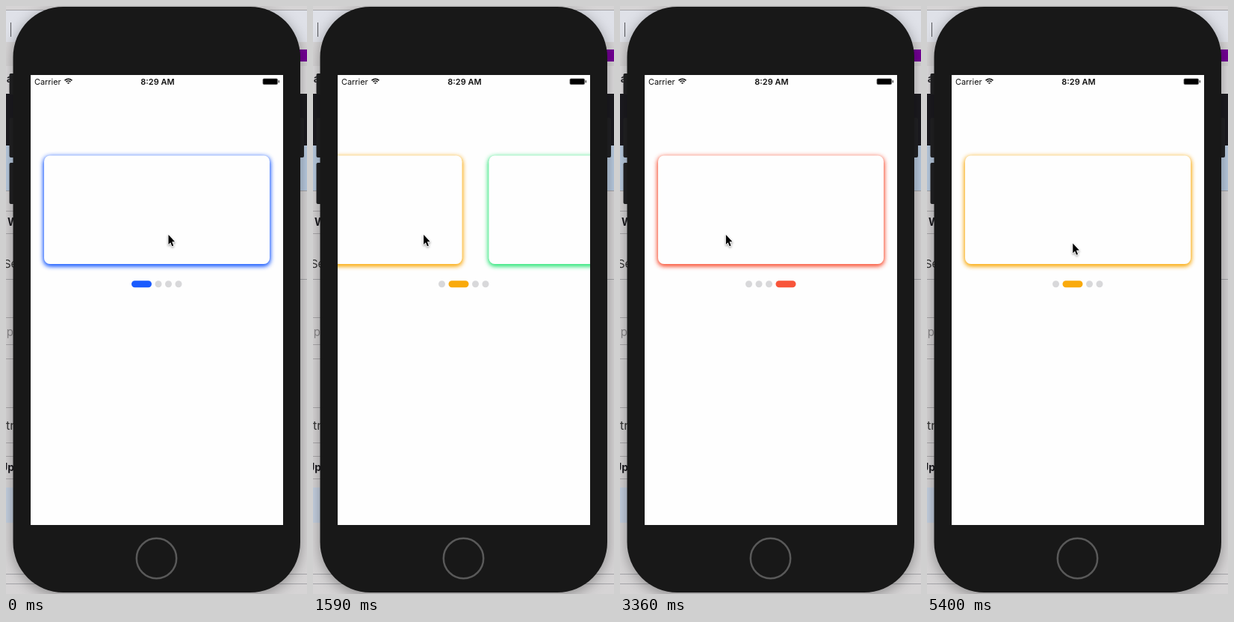
Animation, 403 px wide and 784 px high, one loop 5430 ms. Source, as an HTML page with a canvas:

```html
<!DOCTYPE html>
<html lang="en">
<head>
<meta charset="utf-8">
<title>Card carousel</title>
<style>
  html, body { margin: 0; width: 100%; height: 100%; overflow: hidden; background: #d6d4d5; }
  canvas { display: block; width: 403px; height: 784px; }
</style>
</head>
<body>
<canvas id="stage" width="403" height="784"></canvas>
<script>
const W = 403, H = 784, LOOP = 5430, TICK = 30;
const SCREEN = { x: 33, y: 92, w: 338, h: 600 };
const CARD = { x: 51, y: 199.5, w: 302, h: 144.5, r: 8 };
const SANS = 'Inter, "Helvetica Neue", sans-serif';
const INK = '#1c1b20';
const GREY = [216, 216, 218];
const COLORS = [[26, 91, 254], [249, 170, 12], [46, 230, 122], [248, 85, 58]];

// A swipe drags the pointer from grab to drop, then the page coasts to rest.
const DRAG_MS = 160, SWIPE_MS = 460, DOT_MS = 350;
const SWIPES = [
  { from: 0, to: 1, at: 645, grab: 255, drop: 158 },
  { from: 1, to: 2, at: 1431, grab: 256, drop: 147 },
  { from: 2, to: 3, at: 2770, grab: 180, drop: 136 },
  { from: 3, to: 2, at: 3520, grab: 155, drop: 265 },
  { from: 2, to: 1, at: 4101, grab: 165, drop: 284 }
];
const FIRST_X = 217, LAST_X = 185;

const ctx = document.getElementById('stage').getContext('2d');
const clamp = v => Math.max(0, Math.min(1, v));
const lerp = (a, b, k) => a + (b - a) * k;
const smooth = k => k * k * (3 - 2 * k);

function rect(c, x, y, w, h, color) {
  c.fillStyle = color;
  c.fillRect(x, y, w, h);
}

function pill(c, x, y, w, h, r, color) {
  c.fillStyle = color;
  c.beginPath();
  c.roundRect(x, y, w, h, r);
  c.fill();
}

function label(c, text, x, y, font, color, align = 'left') {
  c.font = font + ' ' + SANS;
  c.fillStyle = color;
  c.textAlign = align;
  c.fillText(text, x, y);
}

// The blurred window behind the phone, seen only along its edges
function drawDesk(c) {
  rect(c, 0, 0, W, H, '#d6d4d5');
  rect(c, 0, 6, W, 42, '#dfe1e8');
  rect(c, 0, 80, W, 37, '#dedcde');
  rect(c, 0, 117, W, 69, INK);
  rect(c, 0, 186, W, 60, '#b8cadf');
  rect(c, 0, 642, 33, 47, '#c5d0e0');
  for (const y of [5, 246, 364, 757, 770]) rect(c, 0, y, W, 1, '#a4a4a8');
  for (const y of [273, 303, 415, 451, 470, 535, 582, 600, 630]) rect(c, 0, y, 33, 1, '#aaa8aa');
  rect(c, 6, 22, 1, 19, '#55565a');
  rect(c, 385, 58, 18, 16, '#740096');
  label(c, 'la', -3, 102, '600 14px', INK);
  label(c, 'W', 2, 293, '700 14px', INK);
  label(c, 'Se', -3, 349, '15px', '#333');
  label(c, 'ep', -8, 440, '15px', '#8a888a');
  label(c, 'tr', 0, 565, '16px', '#333');
  label(c, 'Up', -8, 620, '700 14px', INK);
}

function drawStatus(c) {
  label(c, 'Carrier', 38, 105, '10.9px', '#111');
  label(c, '8:29 AM', 203, 105, '600 11px', '#111', 'center');
  const wave = r => c.arc(83.5, 104.3, r, -Math.PI * 0.75, -Math.PI * 0.25);
  c.strokeStyle = '#111';
  c.lineWidth = 1.5;
  for (const r of [1.5, 4.3, 7]) {
    c.beginPath();
    wave(r);
    c.stroke();
  }
  pill(c, 343.5, 96.5, 20.5, 8.5, 2, '#777');
  pill(c, 344.3, 97.2, 19, 7.1, 1.4, '#000');
  pill(c, 364.7, 99, 1.3, 3.4, 0.6, '#333');
}

function drawPhone(c) {
  const button = (x, y, h) => pill(c, x, y, 11, h, 2, '#222224');
  button(4.5, 90, 28);
  button(4.5, 149, 53);
  button(4.5, 209, 55);
  button(388, 149, 53);
  c.save();
  c.shadowColor = 'rgba(0,0,0,.35)';
  c.shadowBlur = 18;
  c.shadowOffsetY = 4;
  pill(c, 9.5, 1, 384.5, 781, 67, '#181818');
  c.restore();
  c.strokeStyle = '#595959';
  c.lineWidth = 2.5;
  c.beginPath();
  c.arc(201.5, 736.5, 26.7, 0, Math.PI * 2);
  c.stroke();
  rect(c, SCREEN.x, SCREEN.y, SCREEN.w, SCREEN.h, '#fefefe');
  drawStatus(c);
}

function buildBackdrop() {
  const layer = document.createElement('canvas');
  layer.width = W;
  layer.height = H;
  const c = layer.getContext('2d');
  drawDesk(c);
  drawPhone(c);
  return layer;
}

// Fast drag that settles slowly on the next page
const swipeEase = u => 1 - Math.pow(1 - Math.pow(clamp(u), 1.6), 3);

function pageAt(t) {
  return SWIPES.reduce((p, s) => p + (s.to - s.from) * swipeEase((t - s.at) / SWIPE_MS), 0);
}

// The active dot switches a little earlier when going back.
function dotWeights(t) {
  const w = [1, 0, 0, 0];
  for (const s of SWIPES) {
    const delay = s.to > s.from ? 172 : 124;
    const k = clamp((t - s.at - delay) / DOT_MS);
    if (k > 0) {
      w[s.from] = 1 - k;
      w[s.to] = k;
    }
  }
  return w;
}

function drawCards(page) {
  ctx.save();
  ctx.beginPath();
  ctx.rect(SCREEN.x, SCREEN.y, SCREEN.w, SCREEN.h);
  ctx.clip();
  ctx.shadowBlur = 6;
  ctx.shadowOffsetY = 2;
  COLORS.forEach((rgb, i) => {
    const x = CARD.x + (i - page) * SCREEN.w;
    ctx.shadowColor = `rgba(${rgb},.9)`;
    // Two passes deepen the glow close to the edge
    for (let pass = 0; pass < 2; pass++) pill(ctx, x, CARD.y, CARD.w, CARD.h, CARD.r, '#fefefe');
  });
  ctx.restore();
}

function drawDots(t) {
  let x = 168;
  dotWeights(t).forEach((k, i) => {
    const w = 9 + 18 * k;
    const rgb = GREY.map((g, n) => Math.round(lerp(g, COLORS[i][n], k)));
    pill(ctx, x, 366.2, w, 9, 4.5, `rgb(${rgb})`);
    x += w + 4.5;
  });
}

// Straight during a drag; otherwise lingers, then hurries to the next grab
function pointerX(t) {
  const next = SWIPES.find(s => s.at > t) || { at: LOOP, grab: LAST_X };
  const last = SWIPES.filter(s => s.at <= t).pop() || { at: -DRAG_MS, drop: FIRST_X };
  const freed = last.at + DRAG_MS;
  if (t < freed) return lerp(last.grab, last.drop, (t - last.at) / DRAG_MS);
  return lerp(last.drop, next.grab, Math.pow((t - freed) / (next.at - freed), 4));
}

const pointerY = t => 304.5 + 11.5 * smooth(clamp((t - 3400) / 500));

const ARROW = new Path2D('M0 0V14.4L3.3 11.3L5.7 17L8 16L5.6 10.4H10.2Z');

function drawPointer(t) {
  ctx.save();
  ctx.translate(pointerX(t) + 0.5, pointerY(t) + 0.5);
  ctx.scale(0.84, 0.9);
  ctx.shadowColor = 'rgba(0,0,0,.4)';
  ctx.shadowBlur = 3;
  ctx.shadowOffsetY = 1.5;
  ctx.strokeStyle = '#fff';
  ctx.lineWidth = 1.8;
  ctx.lineJoin = 'round';
  ctx.stroke(ARROW);
  ctx.shadowColor = 'transparent';
  ctx.fillStyle = '#000';
  ctx.fill(ARROW);
  ctx.restore();
}

const backdrop = buildBackdrop();
const start = performance.now();

function frame() {
  const elapsed = Math.max(0, performance.now() - start) % LOOP;
  const t = Math.floor(elapsed / TICK) * TICK;
  ctx.drawImage(backdrop, 0, 0);
  drawCards(pageAt(t));
  drawDots(t);
  drawPointer(t);
  requestAnimationFrame(frame);
}
frame();
</script>
</body>
</html>
```
